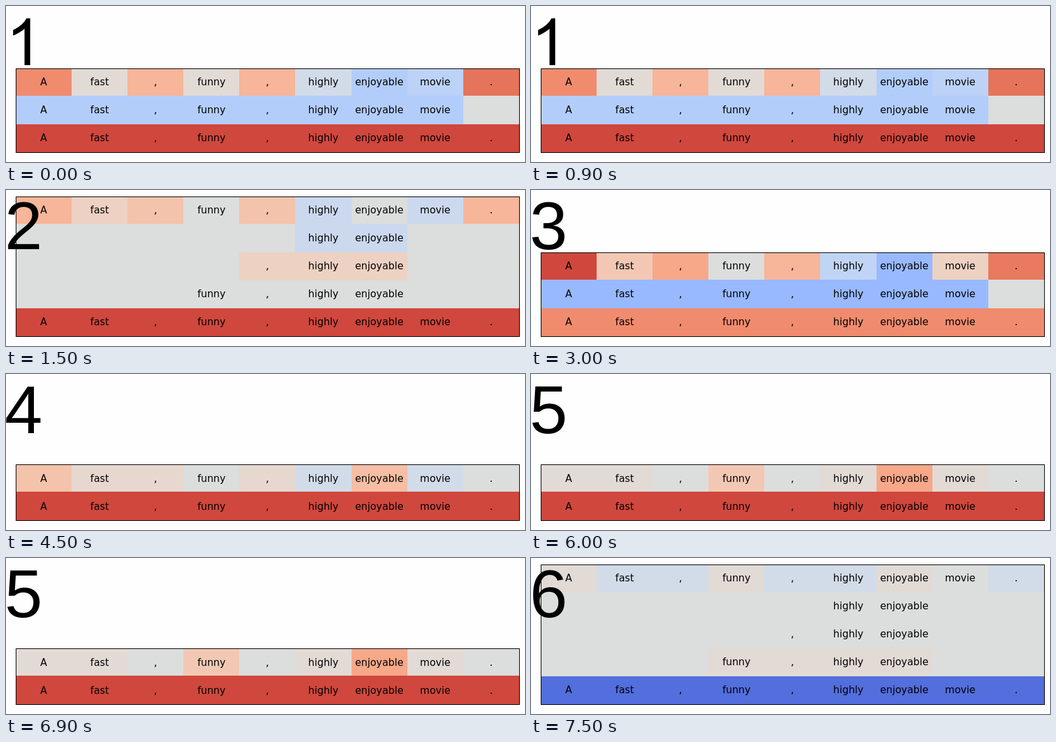
These frames come from a looping animation (799 by 240 pixels, 8000 ms). An HTML page with a canvas:

```html
<!DOCTYPE html>
<html lang="en">
<head>
<meta charset="utf-8">
<title>Token heatmaps by layer</title>
<style>
html, body { margin: 0; width: 100%; height: 100%; overflow: hidden; background: #fefefe; }
canvas { display: block; }
</style>
</head>
<body>
<canvas id="stage" width="799" height="240"></canvas>
<script>
const ctx = document.getElementById("stage").getContext("2d");
const WORDS = ["A", "fast", ",", "funny", ",", "highly", "enjoyable", "movie", "."];
const LEFT = 15, BOTTOM = 225, CELL_W = 86.1, CELL_H = 43;
const SCENE_MS = 1500, LOOP_MS = 8000;

// Diverging scale: capitals are cold, lower case is warm, n is neutral.
const COLORS = {
  A: "#536edd", B: "#98b9ff", C: "#b3cdfb", D: "#bcd2f7", E: "#c0d4f5", F: "#cbd8ee", G: "#d2dbe8",
  n: "#dcdddd",
  a: "#e2dad5", b: "#e6d7cf", c: "#edd1c2", d: "#f2c8b4", e: "#f4c3ab", f: "#f6bea4",
  g: "#f7b599", h: "#f7a889", i: "#f08b6e", j: "#e97a5f", k: "#e5745a", l: "#d0473d"
};

// One letter per cell; a dot is a neutral cell without its word.
const SCENES = [
  ["iagagGCDk", "CCCCCCCC.", "lllllllll"],
  ["gceneFnFg", ".....FF..", "....ccc..", "...nnnn..", "lllllllll"],
  ["ldhngEBcj", "BBBBBBBB.", "iiiiiiiii"],
  ["ebbnbGfGn", "lllllllll"],
  ["aandnahan", "lllllllll"],
  ["aGGaGGanG", ".....nn..", "....nnn..", "...aaaa..", "AAAAAAAAA"]
];

// A numeral one with a plain stem and no foot.
const ONE = new Path2D("M37.25 91H28.5V35Q25.3 38 20.1 41T10.9 45.6V37.1" +
  "Q18.3 33.6 23.8 28.7T31.6 19.1H37.25Z");

const columnEdge = i => Math.round(LEFT + CELL_W * i - 0.05);

function drawGrid(rows) {
  const top = BOTTOM - CELL_H * rows.length;
  const rowEdge = i => top + CELL_H * i - (i === 1 ? 1 : 0);
  const baseline = top + (rows.length === 2 ? 27 : 26);
  ctx.font = '15.28px "DejaVu Sans", sans-serif';
  ctx.textAlign = "center";
  rows.forEach((row, r) => [...row].forEach((key, c) => {
    const x = columnEdge(c), y = rowEdge(r);
    ctx.fillStyle = COLORS[key] || COLORS.n;
    ctx.fillRect(x, y, columnEdge(c + 1) - x, rowEdge(r + 1) - y);
    if (key === ".") return;
    ctx.fillStyle = "#000";
    ctx.fillText(WORDS[c], LEFT + CELL_W * (c + 0.5), baseline + CELL_H * r);
  }));
  ctx.strokeRect(LEFT + 0.5, top + 0.5, 775, BOTTOM - top);
}

function drawNumber(n) {
  ctx.fillStyle = "#000";
  if (n === 1) return ctx.fill(ONE);
  ctx.font = '104.5px "Liberation Sans", Arial, sans-serif';
  ctx.textAlign = "left";
  ctx.fillText(n, -2, 91);
}

function frame() {
  const scene = Math.floor(performance.now() % LOOP_MS / SCENE_MS);
  ctx.fillStyle = "#fefefe";
  ctx.fillRect(0, 0, 799, 240);
  drawGrid(SCENES[scene]);
  drawNumber(scene + 1);
  requestAnimationFrame(frame);
}
frame();
</script>
</body>
</html>
```
